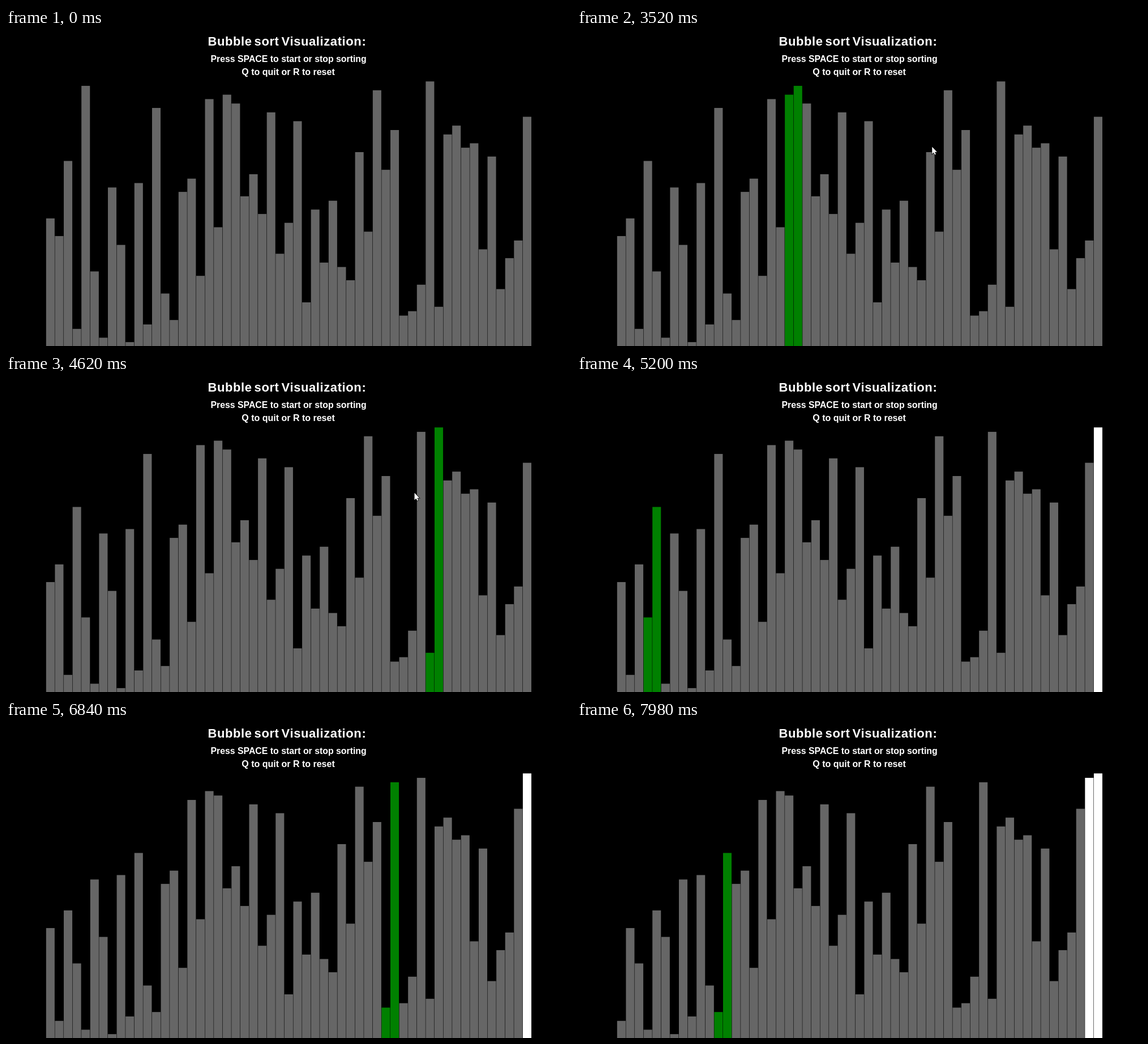
An HTML page with a canvas that plays this animation: 998 px wide and 561 px high, repeating every 8000 ms.

```html
<!DOCTYPE html>
<html lang="en">
<head>
<meta charset="utf-8">
<title>Bubble sort</title>
<style>
  html, body { margin: 0; width: 100%; height: 100%; overflow: hidden; background: #000; }
  canvas { display: block; }
</style>
</head>
<body>
<canvas id="stage" width="998" height="561"></canvas>
<script>
const ctx = document.getElementById('stage').getContext('2d');
const LOOP = 8000, SORT_START = 2640, CURSOR_IN = 2120, CURSOR_EXIT = 4560, CURSOR_OUT = 4800;
const LEFT = 70.85, PITCH = 15.594, BAR = 15.05, BASE = 561.95, UNIT = 7.795;
const values = [
  29, 25, 42, 4, 59, 17, 2, 36, 23, 1, 37, 5, 54, 12, 6, 35, 38, 16, 56, 27,
  57, 55, 34, 39, 30, 53, 21, 28, 51, 10, 31, 19, 33, 18, 15, 44, 26, 58, 40,
  49, 7, 8, 14, 60, 9, 48, 50, 45, 46, 22, 43, 13, 20, 24, 52
];

// One snapshot for every comparison of the first passes
function bubbleSteps(source, passes) {
  const list = source.slice(), steps = [];
  for (let pass = 0; pass < passes; pass++) {
    for (let j = 0; j < list.length - 1 - pass; j++) {
      if (list[j] > list[j + 1]) [list[j], list[j + 1]] = [list[j + 1], list[j]];
      steps.push({ list: list.slice(), j, sortedFrom: list.length - pass });
    }
  }
  return steps;
}
const idle = { list: values, j: -9, sortedFrom: values.length };
const steps = bubbleSteps(values, 3);

// Three ticks every 140 ms; one comparison is skipped every 24 ticks
function stateAt(t) {
  const u = t - SORT_START, phase = u % 140;
  const tick = Math.floor(u / 140) * 3 + (phase < 20 ? 0 : phase < 40 ? 1 : 2) - 1;
  if (u < 0 || tick < 0) return idle;
  return steps[tick + Math.max(0, Math.floor((tick - 2) / 24))];
}

function drawBars({ list, j, sortedFrom }) {
  list.forEach((v, i) => {
    ctx.fillStyle = i === j || i === j + 1 ? '#008000' : i >= sortedFrom ? '#fff' : '#666';
    ctx.fillRect(LEFT + i * PITCH, BASE - v * UNIT, BAR, v * UNIT);
  });
}

function label(text, x, y, size, letterGap = 0, wordGap = 0) {
  ctx.font = `bold ${size}px "Liberation Sans", Arial, sans-serif`;
  ctx.letterSpacing = letterGap + 'px';
  ctx.wordSpacing = wordGap + 'px';
  ctx.fillStyle = '#fff';
  ctx.fillText(text, x, y);
}

const arrow = new Path2D('M0 0V12.4L2.8 9.8L4.7 13.8L6.6 12.9L4.8 9H8.6Z');
function drawCursor(t) {
  if (t < CURSOR_IN || t >= CURSOR_OUT) return;
  const exit = Math.max(0, (t - CURSOR_EXIT) / (CURSOR_OUT - CURSOR_EXIT));
  ctx.save();
  ctx.translate(627.3 + 371 * exit, 209.8);
  ctx.strokeStyle = '#000';
  ctx.lineWidth = 1.4;
  ctx.stroke(arrow);
  ctx.fillStyle = '#fff';
  ctx.fill(arrow);
  ctx.restore();
}

function render(now) {
  const t = now % LOOP;
  ctx.fillStyle = '#000';
  ctx.fillRect(0, 0, 998, 561);
  drawBars(stateAt(t));
  label('Bubble sort Visualization:', 356.4, 30.8, 22, 0.6, -2.7);
  label('Press SPACE to start or stop sorting', 361.4, 59.6, 15.85);
  label('Q to quit or R to reset', 416.3, 82.7, 16);
  drawCursor(t);
}

const start = performance.now();
function loop() {
  render(performance.now() - start);
  requestAnimationFrame(loop);
}
loop();
</script>
</body>
</html>
```
